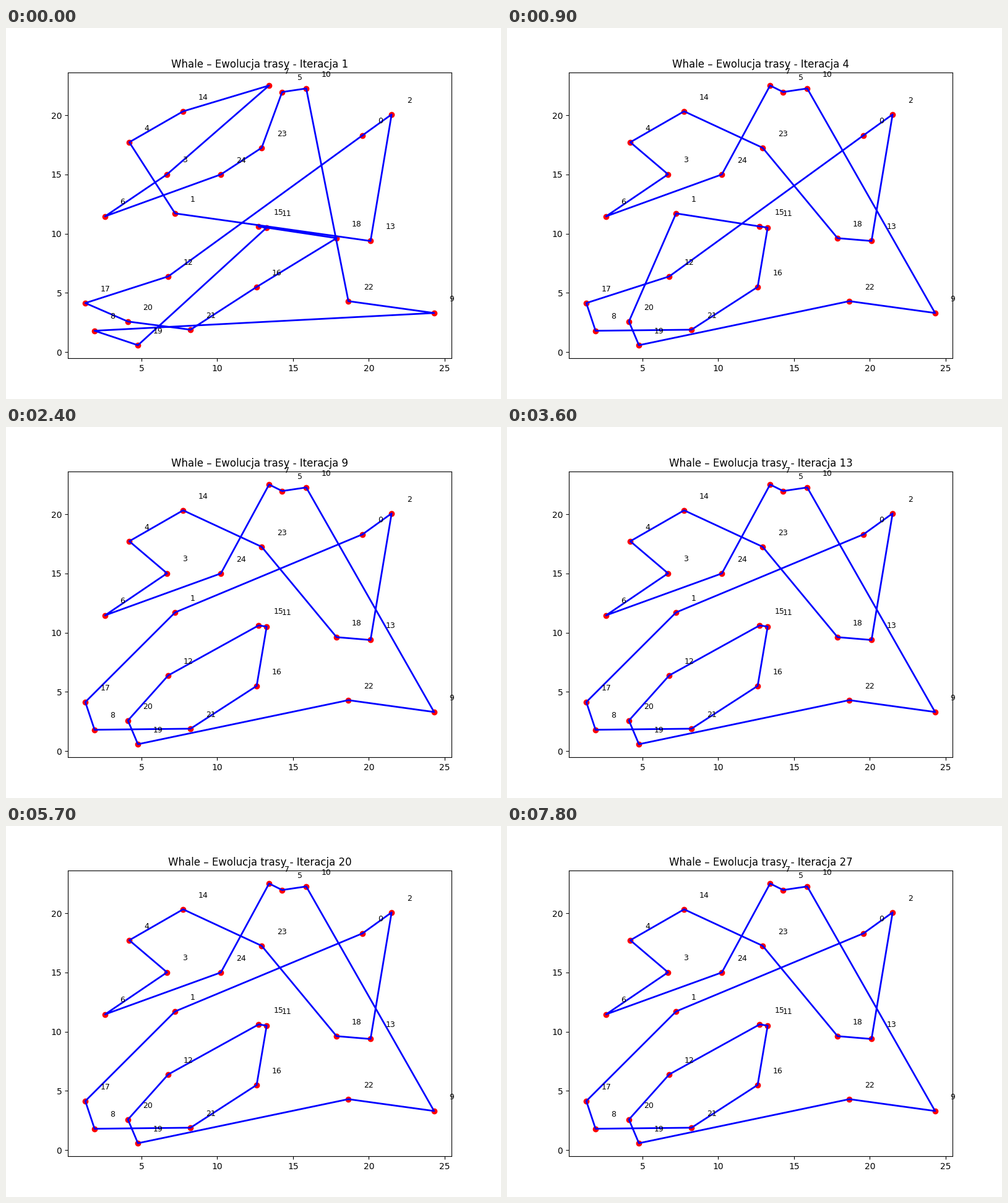
Animation of 800 by 600 pixels, one loop 8 s. Source, as a matplotlib script:

```python
import matplotlib.pyplot as plt
import numpy as np
from matplotlib.animation import FuncAnimation

STEP_MS = 300
INTERVAL_MS = 100
LOOP_MS = 8000

# Key points: the cities to visit, in label order.
CITIES = np.array([
    (19.58, 18.30), (7.22, 11.71), (21.50, 20.07), (6.69, 15.01), (4.20, 17.72),
    (14.28, 21.96), (2.60, 11.46), (13.42, 22.51), (1.91, 1.80), (24.30, 3.30),
    (15.87, 22.26), (13.26, 10.51), (6.77, 6.39), (20.11, 9.38), (7.75, 20.33),
    (12.73, 10.61), (12.60, 5.50), (1.30, 4.14), (17.87, 9.62), (4.77, 0.58),
    (4.11, 2.58), (8.24, 1.89), (18.65, 4.30), (12.93, 17.25), (10.24, 15.00),
])

START = "0 2 13 1 4 14 7 3 6 24 23 5 10 22 9 8 19 11 15 18 16 21 20 17 12"

# Pairs of cities that trade places in the tour at a given iteration.
SWAPS = {
    2: [(4, 23), (4, 7), (9, 22), (19, 20), (11, 15)],
    4: [(8, 19), (1, 18), (1, 11), (1, 15)],
    7: [(1, 12)],
}


def best_tour(iteration):
    tour = [int(city) for city in START.split()]
    for step, pairs in SWAPS.items():
        if step <= iteration:
            for a, b in pairs:
                i, j = tour.index(a), tour.index(b)
                tour[i], tour[j] = b, a
    return tour


fig, ax = plt.subplots(figsize=(8, 6), dpi=100)
ax.scatter(*CITIES.T, color="red")
for label, (x, y) in enumerate(CITIES):
    ax.text(x + 1, y + 1, str(label), fontsize=9)
route, = ax.plot([], [], color="blue", linewidth=2)
title = ax.set_title("")


def update(frame):
    iteration = 1 + frame * INTERVAL_MS // STEP_MS
    tour = best_tour(iteration)
    route.set_data(*CITIES[tour + tour[:1]].T)
    title.set_text(f"Whale – Ewolucja trasy - Iteracja {iteration}")
    return route, title


animation = FuncAnimation(fig, update, frames=LOOP_MS // INTERVAL_MS,
                          interval=INTERVAL_MS, repeat=True, blit=False)
plt.show()
```
